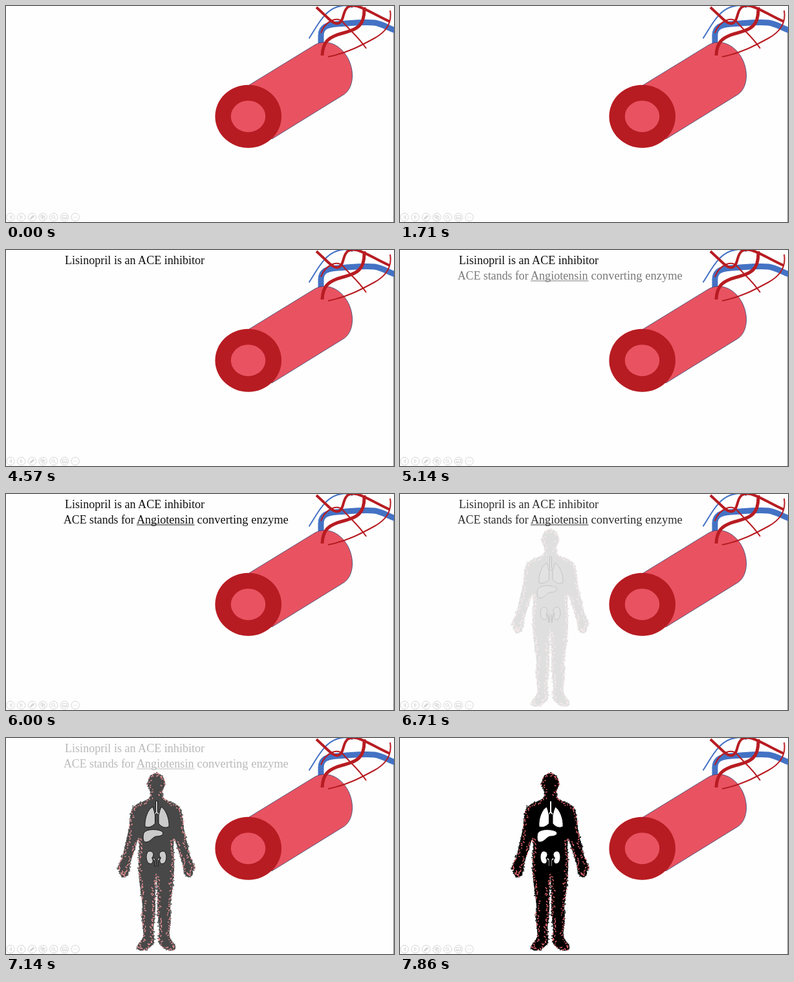
Animation, 600 px wide and 336 px high, one loop 8000 ms. Source, as an HTML page:

```html
<!DOCTYPE html>
<html lang="en">
<head>
<meta charset="utf-8">
<title>ACE inhibitor</title>
<style>
html, body { margin: 0; width: 100%; height: 100%; overflow: hidden; background: #fefefe; }
svg { display: block; width: 100vw; height: 100vh; }
text { font: 18.1px "Liberation Serif", "Times New Roman", serif; fill: #101010; }
.line1, .line2, .fade { opacity: 0; animation: 8s linear infinite; }
.line1 { animation-name: line1; }
.line2 { animation-name: line2; }
.fade { animation-name: figure; }
@keyframes line1 {
  0%, 37.5% { opacity: 0; }
  46.25%, 82.79% { opacity: 1; }
  91.85%, 100% { opacity: 0; }
}
@keyframes line2 {
  0%, 59.4% { opacity: 0; }
  68.1%, 82.79% { opacity: 1; }
  91.85%, 100% { opacity: 0; }
}
@keyframes figure {
  0%, 82.79% { opacity: 0; }
  91.85%, 100% { opacity: 1; }
}
.nav { fill: none; stroke: #d2d2d2; stroke-width: .9; }
.vessels { fill: none; stroke: #b71c22; }
.blue { stroke: #4472c4; }
.organs { fill: #fff; stroke: #000; stroke-width: 1; }
</style>
</head>
<body>
<svg viewBox="0 0 600 336" preserveAspectRatio="none">
  <path d="M599.5 40V336" stroke="#8a8a8a" stroke-width="1"/>

  <g class="vessels">
    <path class="blue" stroke-width="9" d="M487 58V46C487 32 497 29 512 28C532 27 552 24 570 26C583 28 590 34 602 38"/>
    <path class="blue" stroke-width="2" d="M468.500 50.500C480 34 492 4 518 0Q527 -2 536 2"/>
  </g>
  <path d="M376 123L475 62C496 48 521 62 531 86C540 108 535 130 522 138L411 207Z" fill="#e95361" stroke="#34416f" stroke-width=".8"/>
  <ellipse cx="374.700" cy="171.700" rx="51.300" ry="49" fill="#b71c22"/>
  <ellipse cx="374.500" cy="171.700" rx="26.700" ry="24.500" fill="#e95361"/>
  <g class="vessels">
    <path stroke-width="5" d="M489 77C490 57 497 49 518 43C543 36 555 32 554 2"/>
    <path stroke-width="4" d="M480 2L497 18C510 31 518 31 522 14C525 2 530 -2 542 0C555 3 571 14 593 24"/>
    <path stroke-width="2" d="M498 79C526 74 550 61 570 50C590 39 597 25 594 7"/>
    <path stroke-width="2" d="M487 42C493 24 512 15 521 25C531 37 545 48 557 66"/>
  </g>

  <g class="nav" id="nav">
    <path d="M8.500 326L5.500 328.500L8.500 331ZM22.500 326L25.500 328.500L22.500 331Z"/>
    <path d="M37.500 331.500L38 329.500L42 325.500L43.500 327L39.500 331Z" fill="#d2d2d2"/>
    <path d="M54 325.500H58V329H54ZM56 327.500H60V331.500H56Z"/>
    <path d="M74.500 329.500L77 332M87 326H94V331H87ZM88 329.500H93"/>
    <circle cx="73" cy="328" r="2.200"/>
    <path d="M104 328.500H110" stroke-dasharray="1.2 1.200"/>
  </g>

  <g class="fade">
    <path id="body" stroke="#000" stroke-width=".5"/>
    <path id="jags" stroke="#000" fill="none" stroke-width="1.600"/>
    <path id="specks" stroke="#ee6b72" fill="none" stroke-width="1.400" stroke-linecap="round"/>
  </g>
  <g class="fade organs">
    <path d="M231.500 98H234.500V115L238 119L236.500 121L233 117L229.500 121L228 119L231.500 115Z"/>
    <path d="M227 107C219 111 214 126 215 138Q223 141 230.500 133V120Q229 112 227 107Z"/>
    <path d="M240 107C247 111 253 126 252 138Q243 142 236 133V120Q238 112 240 107Z"/>
    <path d="M213 148C217 140 238 142 242 146C245 151 238 153 232 153C225 155 224 162 215 162C211 159 212 152 213 148Z"/>
    <path d="M223 176C216 175 215 191 221 195C227 198 229 190 225.500 186.500C230 182 228 177 223 176Z"/>
    <path d="M242 176C249 175 250 191 244 195C238 198 236 190 239.500 186.500C235 182 237 177 242 176Z"/>
    <path d="M227 187Q231 186 231 191V199.500H229.500V191Q229 189 227 189ZM238 187Q234 186 234 191V199.500H235.500V191Q236 189 238 189Z"/>
  </g>

  <text class="line1" x="91" y="22">Lisinopril is an ACE inhibitor</text>
  <g class="line2">
    <text x="89" y="46" style="font-size:17.8px">ACE stands for</text>
    <text x="202" y="46">Angiotensin</text>
    <path d="M202 48H291.500" stroke="#101010"/>
    <text x="295.500" y="46" style="font-size:18.500px">converting enzyme</text>
  </g>
</svg>
<script>
const $ = id => document.getElementById(id);

let seed = 7;
const random = () => (seed = (seed * 16807) % 2147483647) / 2147483647;
const spread = size => (random() - .5) * size;

for (let i = 0; i < 7; i++) {
  const ring = document.createElementNS("http://www.w3.org/2000/svg", "circle");
  ring.setAttribute("cx", 7 + i * 16.7);
  ring.setAttribute("cy", 328.5);
  ring.setAttribute("r", 6.2);
  $("nav").append(ring);
}

// Left half of the silhouette, from crown to crotch.
const half = [
  [232, 55], [223, 58], [220, 67], [218.5, 71], [221, 77], [224, 84], [223.5, 93],
  [213, 99], [198, 105], [193, 115], [191, 140], [185, 165], [180, 188], [171, 204],
  [177, 204], [176, 213], [183, 218], [190, 210], [191, 196], [198, 176], [205, 152],
  [207, 168], [205, 192], [206, 217], [209, 242], [212, 262], [210, 282], [214, 308],
  [208, 317], [202, 324], [205, 331], [218, 329], [228, 321], [229, 312], [227, 300],
  [231, 270], [230, 240], [232, 214]
];
const mirrored = half.map(([x, y]) => [465 - x, y]).reverse();
const outline = half.concat(mirrored);

// Smooth closed curve through the midpoints of the outline.
const mid = (a, b) => [(a[0] + b[0]) / 2, (a[1] + b[1]) / 2];
const body = $("body");
body.setAttribute("d", "M" + mid(outline.at(-1), outline[0]) + outline.map((p, i) =>
  `Q${p} ${mid(p, outline[(i + 1) % outline.length])}`).join("") + "Z");

function dashes(step, inset, scatter, length) {
  let d = "";
  for (let s = 0; s < body.getTotalLength(); s += step) {
    const a = body.getPointAtLength(s);
    const b = body.getPointAtLength(s + 1);
    const depth = inset + spread(scatter);
    const x = a.x + (b.y - a.y) * depth;
    const y = a.y - (b.x - a.x) * depth;
    d += `M${x.toFixed(1)} ${y.toFixed(1)}l${spread(length).toFixed(1)} ${spread(length).toFixed(1)}`;
  }
  return d;
}
$("jags").setAttribute("d", dashes(2.2, 0, 1.5, 4));
$("specks").setAttribute("d", dashes(3.4, 2, 5, 4.5));
</script>
</body>
</html>
```
